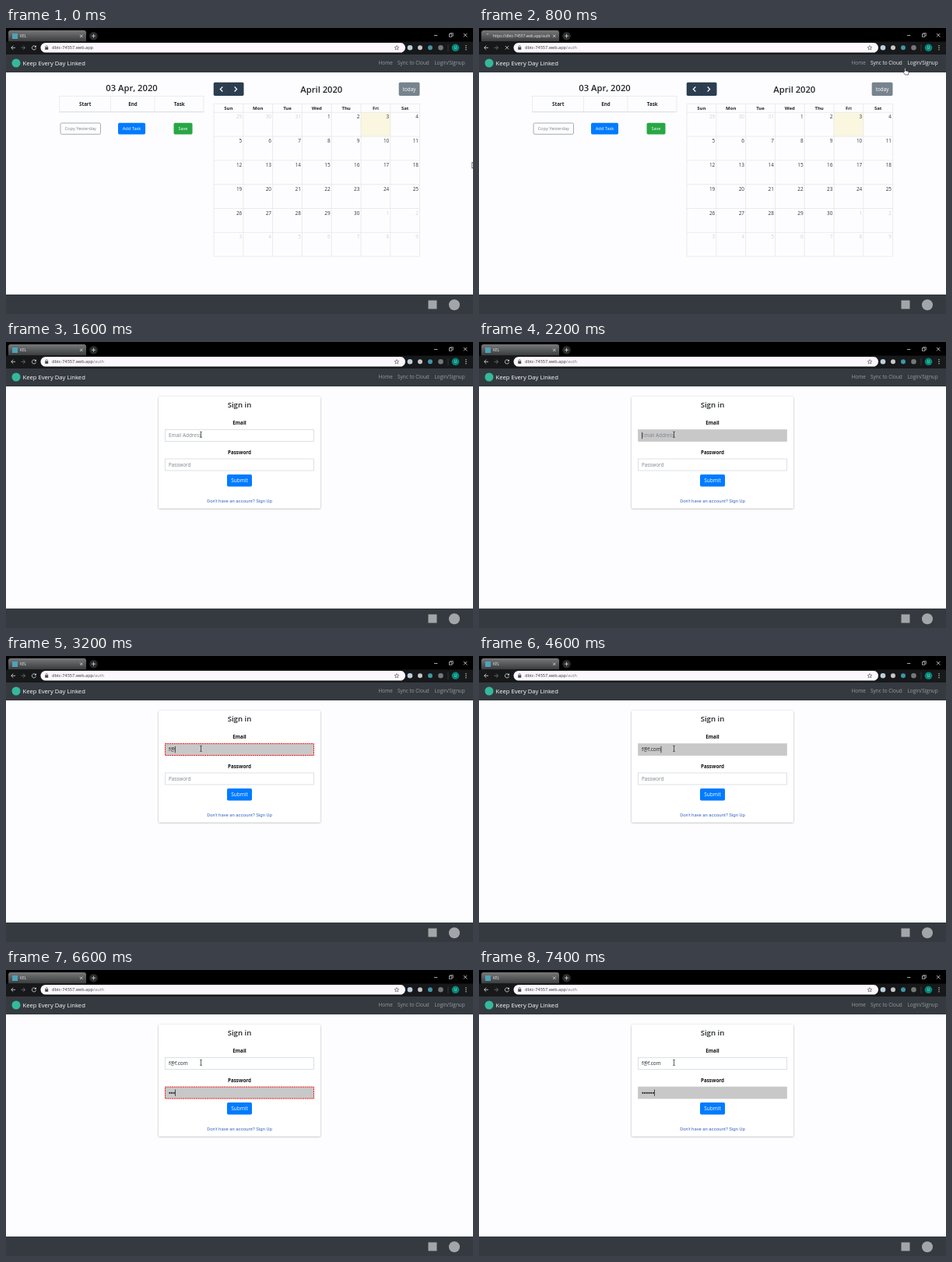
Write an HTML page that moves like this. It is 600 px wide and 367 px high and loops after 8000 ms.

```html
<!DOCTYPE html>
<html lang="en">
<head>
<meta charset="utf-8">
<title>Sign in</title>
<style>
  html, body { margin: 0; width: 100%; height: 100%; overflow: hidden; background: #fdfdff; }
  svg { display: block; width: 100%; height: 100%; }
  text { font-family: "Open Sans", "Noto Sans", sans-serif; white-space: pre; }
</style>
</head>
<body>
<svg id="stage" viewBox="0 0 600 367" xmlns="http://www.w3.org/2000/svg"></svg>
<script>
const LOOP = 8000, STEP = 200;
const EMAIL = 'f@f.com';
const EMAIL_KEYS = [2800, 3000, 3400, 3600, 4000, 4200, 4400];
const PASS_KEYS = [6200, 6400, 6600, 7000, 7200, 7400];
const FOCUS_EMAIL = 1800, FOCUS_PASS = 4800;

const rect = (x, y, w, h, fill, extra = '') =>
  `<rect x="${x}" y="${y}" width="${w}" height="${h}" fill="${fill}" ${extra}/>`;
const circle = (x, y, r, fill, extra = '') =>
  `<circle cx="${x}" cy="${y}" r="${r}" fill="${fill}" ${extra}/>`;
const line = (d, stroke, width = 0.8, extra = '') =>
  `<path d="${d}" fill="none" stroke="${stroke}" stroke-width="${width}" ${extra}/>`;
// y is the middle of the capitals
const text = (s, x, y, size, fill, extra = '') =>
  `<text x="${x}" y="${y + size * 0.36}" font-size="${size}" fill="${fill}" ${extra}>${s}</text>`;
const MID = 'text-anchor="middle"', END = 'text-anchor="end"';
const BOLD = MID + ' font-weight="700"', MEDIUM = MID + ' font-weight="550"';
const group = (id, body) => `<g id="${id}">${body}</g>`;

function browser() {
  const w = '#dcdcdc', dark = '#45474a';
  return rect(0, 0, 600, 33.5, '#000') +
    `<path d="M3 17.5V6q0-3 3-3h94q3 0 3 3v11.5z" fill="url(#tab)"/>` +
    rect(0, 17.5, 600, 16, '#17181a') +
    group('ready', rect(8, 7, 7, 7, '#4da3b8') + text('KEL', 18, 10.3, 4.78, '#eee')) +
    group('busy', line('M10 8.5a2 2 0 0 1 2-1', '#ddd') +
      text('https://dbtc-74557.web.app/auth', 18, 10.3, 4.78, '#eee')) +
    line('M95 8.6l3.4 3.4m0-3.4l-3.4 3.4', '#eee', 0.7) +
    circle(112.5, 10.2, 5.3, '#2b2c2e') + line('M110 10.2h5m-2.5-2.5v5', w) +
    line('M550 9.6h4.4', w) + rect(569.5, 7.8, 3.4, 3.4, 'none', `stroke="${w}" stroke-width=".7"`) +
    line('M570.8 7.6v-1h3.6v3.6h-1', w, 0.6) + line('M588 7l4.4 4.4m0-4.4l-4.4 4.4', w) +
    line('M12 25.3h-5.2m2.5-2.6l-2.6 2.6l2.6 2.6', w) +
    line('M19.5 25.3h5m-2.5-2.6l2.6 2.6l-2.6 2.6', '#77797c') +
    group('reload', line('M38 23.8a2.6 2.6 0 1 0 .5 2.2', w) + `<path d="M38.9 22.3v2.5h-2.5z" fill="${w}"/>`) +
    group('stop', line('M33.8 23l4.4 4.4m0-4.4l-4.4 4.4', w)) +
    rect(44.5, 19, 468.5, 12.6, '#fbf7fd', 'rx="6.3"') +
    rect(50.2, 24.6, 4, 3.2, dark) + line('M51 25v-1.2a1.2 1.2 0 0 1 2.4 0v1.2', dark, 0.6) +
    text('dbtc-74557.web.app<tspan id="route" fill="#77797c">/auth</tspan>', 59, 25.2, 5.58, '#333538') +
    line('M502 22.5l.8 1.9l2 .2l-1.5 1.3l.5 2l-1.8-1.1l-1.8 1.1l.5-2l-1.5-1.3l2-.2z', dark, 0.6) +
    circle(519, 25.3, 3.3, '#b9cfdd') + circle(532, 25.3, 3, '#c4c6c8') +
    circle(545, 25.3, 3, '#3f95a5') + circle(558.5, 25.3, 3.3, '#75777a') +
    line('M568 21v9', '#55575a', 0.5) +
    circle(577.5, 25.3, 4.8, '#00897b') + text('U', 577.5, 25.3, 4.8, '#d5eeea', MID) +
    [22.8, 25.3, 27.8].map(y => circle(591, y, 0.7, w)).join('');
}

function frame() {
  return rect(0, 33, 600, 24, '#343a40') + circle(13, 45, 5.5, '#35b99b') +
    text('Keep Every Day Linked', 21.5, 45.2, 7.65, '#fff') +
    text('Home', 478.5, 45, 6.45, '#999c9f') +
    text('Sync to Cloud', 503, 45, 6.45, '#999c9f', 'class="link"') +
    text('Login/Signup', 550.5, 45, 6.45, '#999c9f', 'class="link"') +
    rect(0, 342, 600, 25, '#343a40') +
    rect(542.5, 349.5, 11, 11, '#a3a6a9') + circle(576, 355.2, 7, '#a3a6a9');
}

function calendar() {
  const x0 = 267, top = 97.3, y0 = 108.3, dx = 37.8, dy = 30.8, grid = '#dddfe2';
  let out = rect(x0 + 5 * dx, y0, dx, dy, '#faf6e0');
  for (let i = 0; i < 8; i++) out += line(`M${x0 + i * dx} ${top}V${y0 + 6 * dy}`, grid, 0.6);
  out += line(`M${x0} ${top}h${7 * dx}`, grid, 0.6);
  for (let i = 0; i < 7; i++) out += line(`M${x0} ${y0 + i * dy}h${7 * dx}`, grid, 0.6);
  'Sun Mon Tue Wed Thu Fri Sat'.split(' ').forEach((d, i) =>
    out += text(d, x0 + (i + 0.5) * dx, 103, 6, '#212529', BOLD));
  for (let i = 0; i < 42; i++) {
    const n = i - 2, inside = n > 0 && n < 31;
    const label = n < 1 ? n + 31 : inside ? n : n - 30;
    out += text(label, x0 + (i % 7 + 1) * dx - 1.6, y0 + Math.floor(i / 7) * dy + 5.7, 6.4,
      inside ? '#33373b' : '#cfd1d3', END);
  }
  return out;
}

function home() {
  const button = (x, y, w, h, label, fill, color, size, extra = '') =>
    rect(x, y, w, h, fill, 'rx="1.7" ' + extra) + text(label, x + w / 2, y + h / 2, size, color, MID);
  return text('03 Apr, 2020', 161.5, 77.3, 11.2, '#212529', MEDIUM) +
    rect(68.5, 87.5, 185.5, 20.5, 'none', 'stroke="#dee2e6" stroke-width=".6"') +
    line('M134.5 87.5v20.5M191 87.5v20.5', '#dee2e6', 0.6) + line('M68.5 107.5h185.5', '#dee2e6', 1) +
    text('Start', 101.7, 97.7, 6.2, '#212529', BOLD) +
    text('End', 163, 97.7, 6.2, '#212529', BOLD) +
    text('Task', 222.7, 97.7, 6.2, '#212529', BOLD) +
    button(70, 122, 51.5, 14.3, 'Copy Yesterday', '#fdfdff', '#7b838a', 5.7, 'stroke="#838a91" stroke-width=".7"') +
    button(144, 121.7, 35, 14.8, 'Add Task', '#007bff', '#fff', 5.7) +
    button(215.5, 121.7, 24, 14.8, 'Save', '#28a745', '#fff', 5.5) +
    rect(266.7, 69.8, 38.8, 17.2, '#2c3e50', 'rx="1.8"') + line('M286 70v17', '#263646', 0.6) +
    line('M278.3 75.5l-3 3l3 3M293.6 75.5l3 3l-3 3', '#fff', 1.2) +
    text('April 2020', 405.3, 78.8, 11.2, '#212529', MEDIUM) +
    button(504.7, 69.8, 26.8, 17.2, 'today', '#77838d', '#fff', 6.3) + calendar();
}

function signIn() {
  const field = (id, y) => rect(204.5, y, 191, 15, '#fff', `id="${id}"`);
  return rect(196, 70, 208, 143.3, '#fff', 'rx="1.5" filter="url(#shadow)"') +
    text('Sign in', 300, 81, 9.6, '#212529', MEDIUM) +
    text('Email', 300, 104, 6.4, '#111', BOLD) + field('mailBox', 112.5) +
    text('', 209, 120, 6.4, '#7b838a', 'id="mail"') +
    text('Password', 300, 141.3, 6.3, '#111', BOLD) + field('passBox', 150) +
    text('Password', 209, 157.6, 6.3, '#7b838a', 'id="hint"') + group('dots', '') +
    rect(284, 170, 32, 15.5, '#007bff', 'rx="1.7"') + text('Submit', 300, 177.8, 6.5, '#fff', MID) +
    text('Don\'t have an account? Sign Up', 300, 204.2, 6.03, '#3b64c0', MID + ' style="font-family:Roboto,sans-serif"') +
    rect(0, 0, 0.7, 8.4, '#111', 'id="caret"');
}

const pointers =
  `<path id="arrow" d="M0 0v8.2l1.9-1.7l1.3 2.8l1.3-.6l-1.3-2.7h2.5z" fill="#fff" stroke="#111" stroke-width=".6"/>` +
  `<path id="hand" d="M-.7 4.6V.6q0-.8.7-.8t.7.8v2.8l3 .6q1 .3.9 1.3l-.5 3.2h-4l-2.6-3.2q.8-1 1.8-.7z" fill="#fff" stroke="#111" stroke-width=".6"/>` +
  `<path id="beam" d="M-1.4-3.6h1l.4.3l.4-.3h1M0-3.3v6.6M-1.4 3.6h1l.4-.3l.4.3h1" fill="none" stroke="#222" stroke-width=".7"/>`;

document.getElementById('stage').innerHTML = `<defs>
  <linearGradient id="tab" x2="0" y2="1"><stop stop-color="#777879"/><stop offset="1" stop-color="#3a3b3c"/></linearGradient>
  <filter id="shadow" x="-5%" y="-5%" width="110%" height="112%">
    <feDropShadow dx="0" dy=".7" stdDeviation=".8" flood-color="#000" flood-opacity=".34"/></filter></defs>` +
  rect(0, 0, 600, 367, '#fdfdff') + group('home', home()) + group('signIn', signIn()) +
  frame() + browser() + pointers;

const $ = id => document.getElementById(id);
const show = (id, on) => $(id).setAttribute('display', on ? 'inline' : 'none');
const set = (el, attrs) => Object.entries(attrs).forEach(([k, v]) => el.setAttribute(k, v));
const typed = (keys, t) => keys.filter(k => k <= t).length;

// time, x, y, shape
const PATH = [[0, 598.8, 172, 'arrow'], [200, 588, 146, 'arrow'], [400, 566, 92, 'arrow'],
  [600, 548, 53, 'hand'], [800, 547.5, 51.5, 'hand'], [1000, 545, 52, 'arrow'],
  [1200, 543, 54, 'arrow'], [1400, 340, 102, 'arrow'], [1600, 250.5, 118.8, 'beam']];

function styleField(id, focused, invalid) {
  set($(id), {
    fill: focused ? '#c8c8c8' : '#fff',
    stroke: invalid ? '#f00000' : focused ? '#c8c8c8' : '#ced4da',
    'stroke-width': invalid ? 0.9 : 0.7,
    'stroke-dasharray': invalid ? '2 .8' : 'none'
  });
}

function draw(now) {
  const t = Math.floor(now % LOOP / STEP) * STEP;
  const loading = t >= 600 && t < 1400, auth = t >= 1000;
  show('home', !auth);
  show('signIn', auth);
  show('ready', !loading);
  show('busy', loading);
  show('reload', !loading);
  show('stop', loading);
  show('route', t >= 600);
  document.querySelectorAll('.link').forEach(el =>
    el.setAttribute('fill', t >= 600 && t < 1000 ? '#f2f2f2' : '#999c9f'));

  const n = typed(EMAIL_KEYS, t), value = EMAIL.slice(0, n);
  const onMail = t >= FOCUS_EMAIL && t < FOCUS_PASS, onPass = t >= FOCUS_PASS;
  $('mail').textContent = value || 'Email Address';
  $('mail').setAttribute('fill', value ? '#222' : '#7b838a');
  styleField('mailBox', onMail, n > 0 && !/^\w+@\w+(\.\w+)*$/.test(value));

  const p = typed(PASS_KEYS, t);
  show('hint', !p);
  $('dots').innerHTML = Array.from({ length: p }, (_, i) => circle(210.4 + i * 2.7, 157.8, 1.05, '#111')).join('');
  styleField('passBox', onPass, p > 0 && p < 6);

  const last = Math.max(...[FOCUS_EMAIL, FOCUS_PASS, ...EMAIL_KEYS, ...PASS_KEYS].filter(k => k <= t));
  show('caret', (onMail || onPass) && Math.floor((t - last) / 500) % 2 === 0);
  const width = onPass ? p * 2.7 : n && $('mail').getComputedTextLength();
  set($('caret'), { x: 209 + width, y: onPass ? 153.4 : 115.8 });

  const [, x, y, shape] = PATH.filter(k => k[0] <= t).pop();
  ['arrow', 'hand', 'beam'].forEach(id => show(id, id === shape));
  $(shape).setAttribute('transform', `translate(${x} ${y})`);
}

const start = performance.now();
(function tick() {
  draw(performance.now() - start);
  requestAnimationFrame(tick);
})();
</script>
</body>
</html>
```
